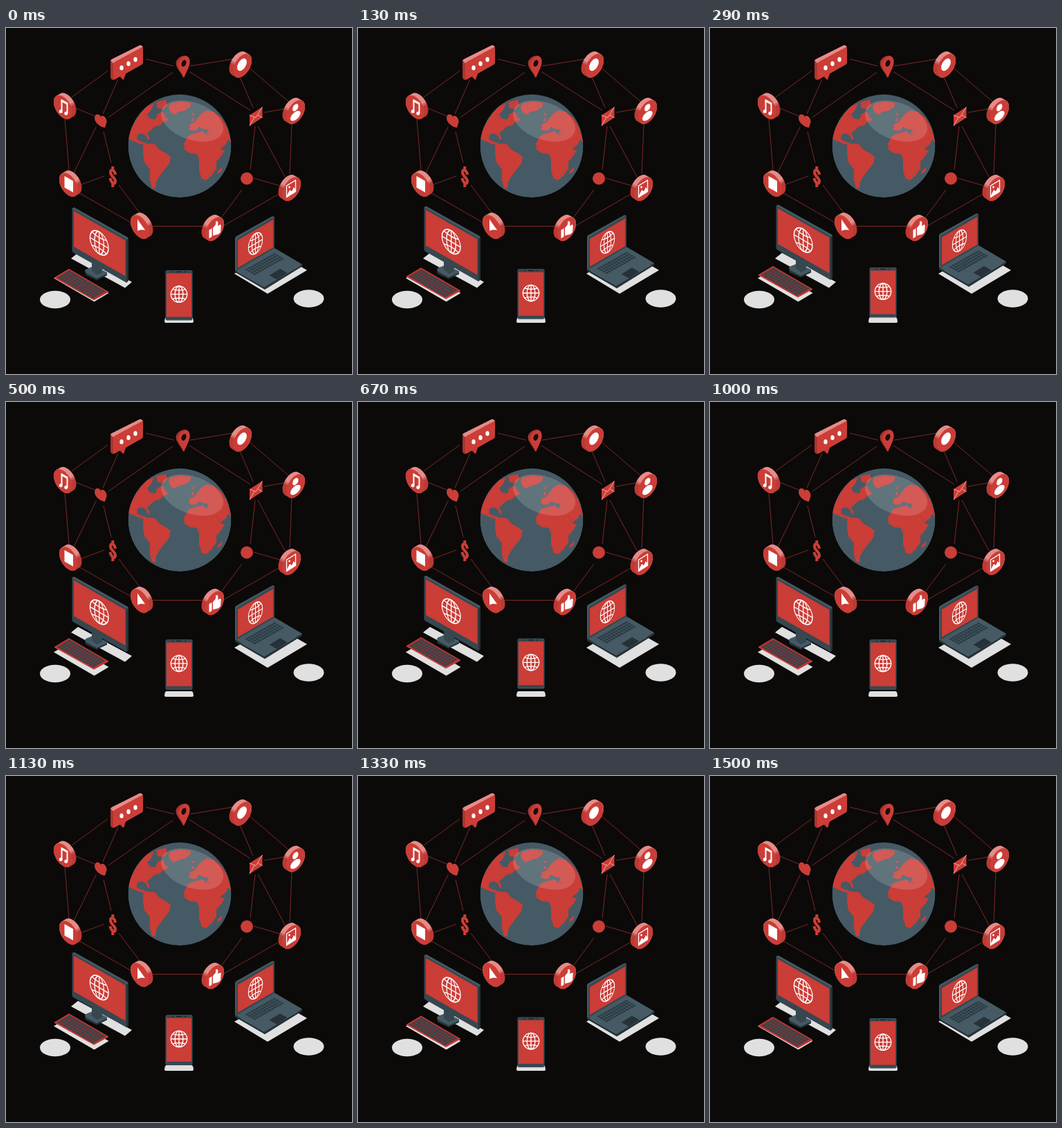
Recreate the animation shown at these times as an HTML page. Size 500 px wide and 500 px high, loop 1.54 s.

```html
<!DOCTYPE html>
<html lang="en">
<head>
<meta charset="utf-8">
<title>Connected devices</title>
<style>
  html, body { margin: 0; height: 100%; overflow: hidden; background: #0b0a09; }
  svg { display: block; width: 100vw; height: 100vh; }
  .red { fill: #cb3d37; }
  .pink { fill: #e58c88; }
  .deep { fill: #a8322e; }
  .white { fill: #fff; }
  .pale { fill: #e0e0e0; }
  .slate { fill: #455a64; }
  .dark { fill: #37474f; }
  .ink { fill: #263238; }
  .line { fill: none; stroke: #fff; }
</style>
</head>
<body>
<svg viewBox="0 0 500 500">
  <defs>
    <linearGradient id="rim" gradientUnits="userSpaceOnUse" x1="8" y1="-21" x2="-21" y2="8">
      <stop offset=".5" stop-color="#e58c88"/>
      <stop offset=".62" stop-color="#bd3933"/>
    </linearGradient>
    <g id="coin" transform="matrix(.866 -.5 0 1 0 0)">
      <path d="M-6.500-6.500L0 0" stroke="url(#rim)" stroke-width="31" stroke-linecap="round"/>
      <circle class="red" r="15.5"/>
    </g>
    <g id="web" class="line">
      <circle r="10"/>
      <ellipse rx="5" ry="10"/>
      <path d="M0-10V10M-10 0H10M-8-6Q0-3.5 8-6M-8 6Q0 3.5 8 6"/>
    </g>
    <clipPath id="disc"><circle cx="251" cy="170.5" r="74.5"/></clipPath>
  </defs>

  <path stroke="#cb3d37" stroke-width=".6" fill="none" d="M147 62L95 100M202 45L243 55M266 55L327 45M162 74L140 124
    M241 64L148 129M265 63L353 119M338 71L357 115M352 58L408 106M373 122L402 117M101 116L128 127M85 131L91 206
    M130 143L98 209M141 150L152 195M142 214L107 227M163 227L194 268M107 239L182 282M212 286.5H285M312 273L341 234
    M314 286L396 239M360 142L353 205M364 142L403 215M358 217L396 228M413 138L410 211"/>

  <!-- Earth -->
  <g clip-path="url(#disc)">
    <circle class="slate" cx="251" cy="170.5" r="74.5"/>
    <g class="red">
      <path d="M176 160C181 142 190 127 204 113L214 109 210 118 204 125 208 131 216 132 219 124 227 121 230 128 235 133
        227 136 222 141 214 143 209 148 204 152 208 160 205 162 202 155 196 152 190 154 189 161 195 164 204 167 201 170 190 166Z"/>
      <path d="M217 107L231 104 233 111 228 117 219 116Z"/>
      <path d="M237 109L252 106 267 108 267 113 259 119 250 121 243 125 238 122 235 115Z"/>
      <path d="M198 171L204 167 215 168 222 176 231 181 238 186 236 196 228 206 222 214 217 222 216 232 211 231
        208 220 208 204 200 194 198 182Z"/>
      <path d="M257 167L264 155 284 149 288 153 300 155 311 176 316 177 311 185 304 193 304 203 297 213 289 220 283 218 279 206
        279 190 276 182 266 181 258 176Z"/>
      <path d="M264 147L266 139 273 136 277 130 282 124 290 119 300 121 311 130 319 143 326 166 321 161 318 168 310 174
        301 157 290 152 293 147 285 146 279 143 274 149Z"/>
      <path d="M305 208L312 201 312 206 307 211ZM267 125L272 122 272 126ZM267 134L271 129 272 135Z"/>
    </g>
    <ellipse cx="269" cy="134.500" rx="47" ry="27" fill="#fff" opacity=".15" transform="rotate(20 269 134.500)"/>
  </g>

  <!-- Speech bubble -->
  <path class="pink" d="M151 48Q151 46 153 45L193 25Q196 24 198 28L155 52Z"/>
  <path class="deep" d="M151 47L155 51V75Q151 75 151 70ZM164 70L169 75 173 66Z"/>
  <path class="red" d="M154.500 53Q154.500 50.500 157 49L195 28.500Q198 27 198 30V50Q198 52 196 53L173 66 170 75 166 69.500 157 74.500Q154.500 75.500 154.500 72Z"/>
  <g class="white">
    <ellipse cx="167" cy="57.500" rx="2.700" ry="3.500"/>
    <ellipse cx="177" cy="51.500" rx="2.700" ry="3.500"/>
    <ellipse cx="187" cy="45.500" rx="2.700" ry="3.500"/>
  </g>

  <!-- Pin, heart, letter, dollar, dot -->
  <path class="deep" d="M256 72C253 63 245 58 245.500 50C247 43 256 38 262 41L262 60Z"/>
  <path class="red" d="M257 72C255 64 248.500 60 249 52C250 45 257 39 262 41C267 44 266.500 52 263 59Z"/>
  <ellipse cx="257" cy="51" rx="3.200" ry="5" fill="#1a0c0b" transform="rotate(22 257 51)"/>
  <path class="red" d="M143 144C136 143 128 137 128 130C128 124 134 123 137 128C140 124 146 130 145.500 136Z"/>
  <path class="red" d="M352 126L370.500 114V129.500L352 141.500Z"/>
  <path fill="none" stroke="#f0c4c1" stroke-width=".8" d="M352 126L361 129.500 370.500 114M352 141.500L359 129M370.500 129.500L364 126"/>
  <path fill="none" stroke="#cb3d37" stroke-width="4" d="M158 212C157.500 206 151 202 151 208.500S158.500 216 158 222 151.500 223 150.500 217M154.300 200V207M154.300 223V230"/>
  <circle class="red" cx="348" cy="217.500" r="9"/>

  <!-- Coins facing right -->
  <use href="#coin" x="341.600" y="54.500"/>
  <circle class="white" r="8" transform="matrix(.866 -.5 0 1 341 53)"/>

  <use href="#coin" x="418.600" y="121.500"/>
  <g class="white" transform="matrix(.866 -.5 0 1 418.300 121.500)">
    <circle cy="-6.500" r="4.800"/>
    <ellipse cy="5.500" rx="8.500" ry="6"/>
  </g>

  <use href="#coin" x="412.600" y="232.700"/>
  <path class="line" stroke-width="1.300" d="M405.500 228L418.500 220V236.500L405.500 244.500Z"/>
  <path class="white" d="M406 242L410 234 413 236 416 230 418.500 233.500V236L406 244Z"/>
  <circle class="white" cx="409.500" cy="230" r="1.400"/>

  <use href="#coin" x="301.600" y="290.500"/>
  <path class="white" d="M293.500 292L297.500 289.500V301.500L293.500 304ZM299 289L303 284 303 280Q306 277 306.500 282L306 286 309.500 284Q311.500 285 310.500 288L310 295 307 298 299 300Z"/>

  <!-- Coins facing left -->
  <use href="#coin" transform="translate(82.400 114.500) scale(-1 1)"/>
  <path class="line" stroke-width="2" d="M80.500 120V104.500L88.500 109V123"/>
  <path class="line" stroke-width="3" d="M80.500 105L88.500 109.500"/>
  <ellipse class="white" cx="79.200" cy="120.500" rx="2.400" ry="2.600"/>
  <ellipse class="white" cx="86.800" cy="123.300" rx="2.500" ry="2.600"/>

  <use href="#coin" transform="translate(90.400 226.500) scale(-1 1)"/>
  <path class="white" d="M84.500 214L97 221V237.500L84.500 230.500Z"/>

  <use href="#coin" transform="translate(193.400 287.500) scale(-1 1)"/>
  <path class="white" d="M190 276.500L201 292 195.500 291.500 190 293Z"/>

  <!-- Ground -->
  <g class="pale">
    <ellipse cx="71" cy="392.500" rx="22" ry="12.800"/>
    <ellipse cx="437.500" cy="391" rx="22" ry="12.800"/>
    <path d="M94 333L104 325 182 367 172 375.500ZM69 361.500L90 349 148.500 383 127.500 395.500ZM330 355L387 322 435 350 378 384Z"/>
    <path d="M232 418H268Q270 418 270.500 421L271 424Q271 426 269 426H231Q229 426 229 424L229.500 421Q230 418 232 418Z"/>
  </g>

  <g id="devices">
    <!-- Monitor -->
    <path class="ink" d="M114 352L127 346 146 355V357.500L131 364.500 115 357Z"/>
    <path class="slate" d="M114 351Q114 349 117 348L127 344 146 353Q147 355 144 356L131 362 116 354Z"/>
    <path class="dark" d="M124 335L139 343V354L131 357 124 351Z"/>
    <path class="slate" d="M95.500 263Q95.500 259 99 259.500L175 302Q177 303 177 305V365L174 368Z"/>
    <path class="ink" d="M174 306L177 304V365L174 368Z"/>
    <path class="dark" d="M95.500 264Q95.500 261 98 262L172 303.500Q174 304.500 174 307V368L97 324.500Q95.500 323.500 95.500 321Z"/>
    <path class="red" d="M98 264.500L172.500 307V358.500L98 316Z"/>
    <use href="#web" transform="matrix(1.330 .78 0 1.600 134.700 310.500)" stroke-width="1"/>

    <!-- Keyboard -->
    <path class="red" d="M70 360.500L91 348 148 381V382L127 393.500 70 361.500Z"/>
    <path fill="#a3322e" d="M72 360.500L91 349.200 146 381 127 391.700Z"/>
    <path transform="matrix(.865 .5 -.86 .51 91 349)" fill="none" stroke="#37424a" stroke-width="3.600"
      stroke-dasharray="3.600 .7" d="M2 3H62M2 7.200H62M2 11.400H62M2 15.600H62M2 19.800H62"/>

    <!-- Laptop -->
    <path class="ink" d="M331 350L373 374 428 341.500V344.500L374 378 331 353Z"/>
    <path class="slate" d="M331 350L388 318 428 341.500 373 374.500Z"/>
    <path transform="matrix(.87 -.49 .87 .5 345 349)" fill="none" stroke="#2b3a42" stroke-width="3.300"
      stroke-dasharray="3.400 .8" d="M0 2H49M0 6.300H49M0 10.600H49M0 14.900H49"/>
    <path class="ink" d="M380.500 357.500L396 348 406.500 354 391.500 363.500Z"/>
    <path class="slate" d="M331 304Q331 302 333 301L384 272.500Q387 271 388 273.500L334 306V350L331 350Z"/>
    <path class="dark" d="M333 306Q333 304 335 303L386 273.500Q388 272.500 388 275V318.500L333 350.500Z"/>
    <path class="red" d="M335 306.500L386 277V317L335 346.500Z"/>
    <use href="#web" transform="matrix(1.020 -.6 0 1.450 360.500 311.500)" stroke-width="1"/>

    <!-- Phone -->
    <rect class="slate" x="230.500" y="350" width="39" height="72.500" rx="2.500"/>
    <rect class="dark" x="231.300" y="350.500" width="37.400" height="71" rx="2"/>
    <rect class="red" x="232" y="354.500" width="36" height="63"/>
    <path stroke="#11181c" d="M246 352.300H254M240 352.300H242M258 352.300H260"/>
    <use href="#web" transform="translate(250 384.700) scale(1.170)" stroke-width="1.150"/>
  </g>
</svg>
<script>
  const LOOP = 1540, LIFT = 8.6;
  const devices = document.getElementById('devices');
  const rise = u => u + u * u - u * u * u;
  const fall = u => 1 - u * u * (3 - 2 * u);

  function draw(now) {
    const p = (now % LOOP) / LOOP * 2;
    const lift = LIFT * (p < 1 ? rise(p) : fall(p - 1));
    devices.setAttribute('transform', `translate(0 ${-lift})`);
    requestAnimationFrame(draw);
  }
  draw(performance.now());
</script>
</body>
</html>
```
